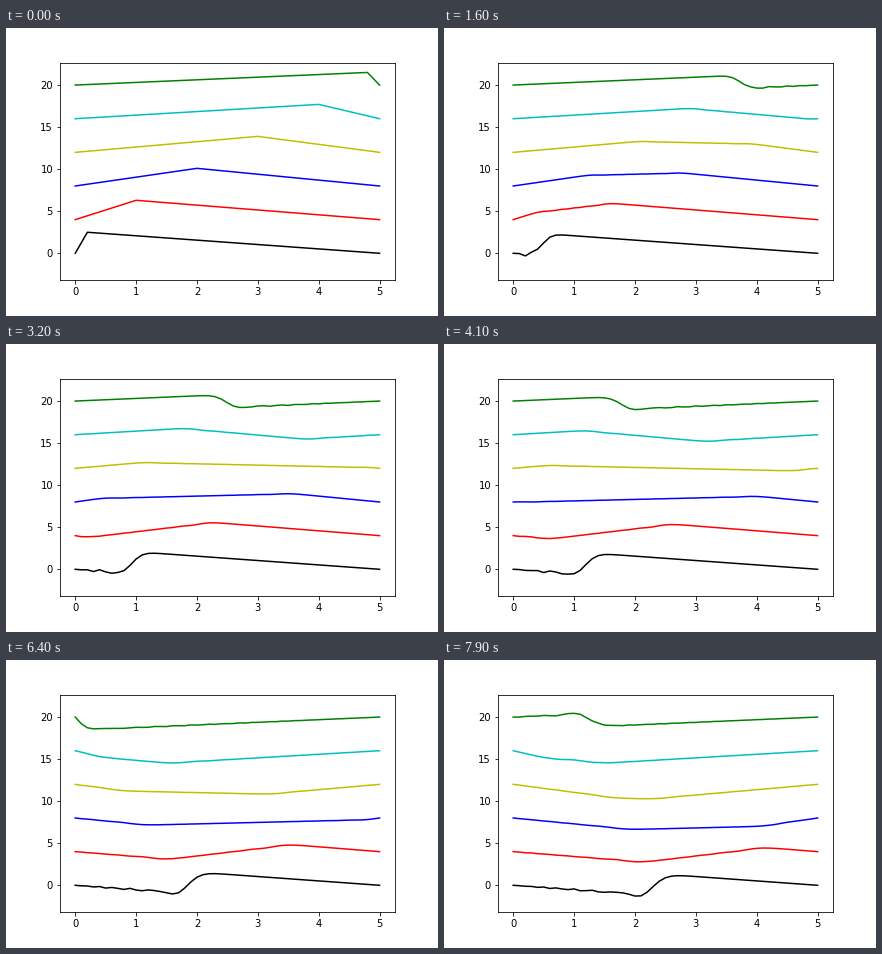
A matplotlib script that plays this animation: 432x288 px, repeating every 8 s.

```python
import numpy as np
import matplotlib.pyplot as plt
from matplotlib.animation import FuncAnimation

FRAMES, INTERVAL = 80, 100
LENGTH, CELLS = 5.0, 50

x = np.linspace(0, LENGTH, CELLS + 1)

# colour, pluck position, pluck height, Courant number
STRINGS = [
    ("k", 0.2, 2.5, 0.3),
    ("r", 1.0, 2.3, 0.4),
    ("b", 2.0, 2.1, 0.5),
    ("y", 3.0, 1.9, 0.6),
    ("c", 4.0, 1.7, 0.7),
    ("g", 4.8, 1.5, 0.8),
]
SPACING = 4


def bend(u):
    """Second difference, zero at the fixed ends."""
    d = np.zeros_like(u)
    d[1:-1] = u[2:] - 2 * u[1:-1] + u[:-2]
    return d


def vibrate(pluck, height, courant):
    """Leapfrog solution of the wave equation for a string released at rest."""
    u = np.empty((FRAMES, x.size))
    u[0] = np.interp(x, [0, pluck, LENGTH], [0, height, 0])
    u[1] = u[0] + 0.5 * courant**2 * bend(u[0])
    for n in range(1, FRAMES - 1):
        u[n + 1] = 2 * u[n] - u[n - 1] + courant**2 * bend(u[n])
    return u


fig, ax = plt.subplots(figsize=(6, 4), dpi=72)
fig.subplots_adjust(left=0.125, right=0.9, bottom=0.125, top=0.88)

waves, lines = [], []
for i, (color, *params) in enumerate(STRINGS):
    wave = SPACING * i + vibrate(*params)
    waves.append(wave)
    lines += ax.plot(x, wave[0], color=color, lw=1.5)

low, high = -2.0, 21.5
pad = 0.05 * (high - low)
ax.set_xlim(-0.25, 5.25)
ax.set_ylim(low - pad, high + pad)
ax.set_xticks(range(6))
ax.set_yticks(range(0, 21, 5))


def update(n):
    for line, wave in zip(lines, waves):
        line.set_ydata(wave[n])
    return lines


anim = FuncAnimation(fig, update, frames=FRAMES, interval=INTERVAL,
                     repeat=True, repeat_delay=0)
plt.show()
```
